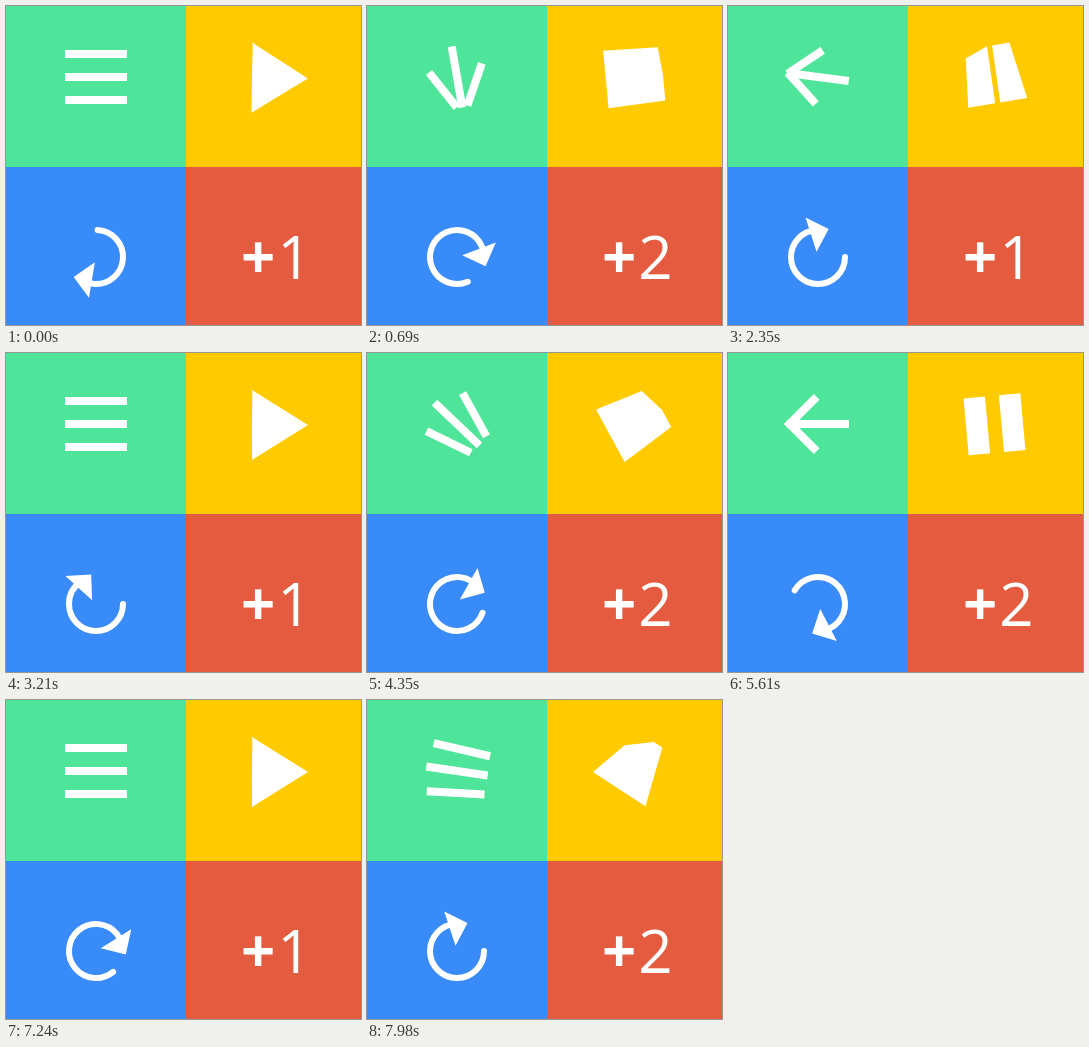
These frames come from a looping animation (355 by 319 pixels, 8.1 s). An HTML page with a canvas:

```html
<!DOCTYPE html>
<html lang="en">
<head>
<meta charset="utf-8">
<title>Four icons</title>
<style>
html, body { margin: 0; width: 100%; height: 100%; overflow: hidden; }
canvas { display: block; }
</style>
</head>
<body>
<canvas id="stage" width="355" height="319"></canvas>
<script>
const ctx = document.getElementById('stage').getContext('2d');
const LOOP = 8100, CYCLE = 3750, TURN = 938.5;
const DEG = Math.PI / 180;

const mix = (a, b, p) => a + (b - a) * p;
// Smooth 0..1 ramp beginning at start and lasting dur
const ramp = (t, start, dur) => {
  const p = Math.min(1, Math.max(0, (t - start) / dur));
  return p * p * (3 - 2 * p);
};

function at(x, y, angle, draw) {
  ctx.save();
  ctx.translate(x, y);
  ctx.rotate(angle);
  draw();
  ctx.restore();
}

function addPolygon(points) {
  points.forEach(([x, y], i) => i ? ctx.lineTo(x, y) : ctx.moveTo(x, y));
  ctx.closePath();
}

function background() {
  const tiles = [
    ['#4ee59a', 0, 0, 180, 161], ['#ffcb00', 180, 0, 175, 161],
    ['#398bf9', 0, 161, 180, 158], ['#e55b3f', 180, 161, 175, 158]
  ];
  for (const [color, ...box] of tiles) {
    ctx.fillStyle = color;
    ctx.fillRect(...box);
  }
}

// Three bars that turn into a left arrow
function menu(c) {
  const angle = Math.PI * (ramp(c, 450, 628) + ramp(c, 2325, 628));
  const fold = ramp(c, 420, 540) - ramp(c, 2300, 540);
  const length = mix(42, 62, (1 - fold) ** 2);
  at(90, 71, angle, () => {
    ctx.fillRect(-31, -4, 62, 8);
    for (const side of [-1, 1]) {
      at(16.2 * fold, side * mix(23, 12.2, fold), -side * 45 * DEG * fold, () =>
        ctx.fillRect(-length / 2, -4, length, 8));
    }
  });
}

// A triangle made of two pieces that become the pause bars
function player(c) {
  const back = ramp(c, 2150, 700);
  const morph = ramp(c, 320, 515) - back;
  const open = ramp(c, 1320, 560) - ramp(c, 2150, 450);
  const angle = -122 + 392 * ramp(c, 0, 2050) - 32 * back;
  const gap = mix(-0.5, 7, open);
  const tip = [40, 0.8];
  const piece = (side, outer, corner) => {
    const point = ([x, y], endX, endY) => [mix(x, endX, morph), mix(y, endY, morph)];
    const inner = ([x, y]) => [x, y + side * gap];
    addPolygon([
      point([-19.4, outer], -28.5, side * 28.5),
      inner(point([-19.4, -3.3], -28.5, 0)),
      inner(point(tip, 28.5, 0)),
      point(corner, 28.5, side * 28.5)
    ]);
  };
  at(266.5, 71.3, angle * DEG, () => {
    for (const shape of [[-1, -36.3, [10.3, -17.8]], [1, 29.7, tip]]) {
      ctx.beginPath();
      piece(...shape);
      ctx.fill();
    }
  });
}

// The head turns steadily while the tail waits and catches up
function refresh(t) {
  const time = t + 75 * Math.max(0, 1 - t / 800);
  const head = 109 + 360 * time / TURN;
  const catchUp = (time - 490 + TURN) / TURN;
  const laps = Math.floor(catchUp);
  const tail = 360 * (laps - 1 + ramp((catchUp - laps) * TURN, 0, 770));
  at(90, 251, 0, () => {
    ctx.beginPath();
    ctx.arc(0, 0, 27, tail * DEG, (head - 25) * DEG);
    ctx.stroke();
    ctx.rotate(head * DEG);
    ctx.beginPath();
    addPolygon([[30, 0], [32.5, -25.7], [4.4, -3.2]]);
    ctx.fill();
  });
}

function counter(c) {
  ctx.textAlign = 'center';
  ctx.font = '700 60px "Open Sans", sans-serif';
  ctx.fillText('+', 252, 273);
  ctx.textAlign = 'left';
  ctx.font = '400 60px "Open Sans", sans-serif';
  ctx.fillText(c >= 450 && c < 2325 ? '2' : '1', 271.2, 273);
}

const began = performance.now();
function frame() {
  const t = (performance.now() - began) % LOOP;
  const c = (t + 50) % CYCLE;
  background();
  ctx.fillStyle = ctx.strokeStyle = '#fff';
  ctx.lineWidth = 6;
  ctx.lineCap = 'round';
  menu(c);
  player(c);
  refresh(t);
  counter(c);
  requestAnimationFrame(frame);
}
frame();
</script>
</body>
</html>
```
